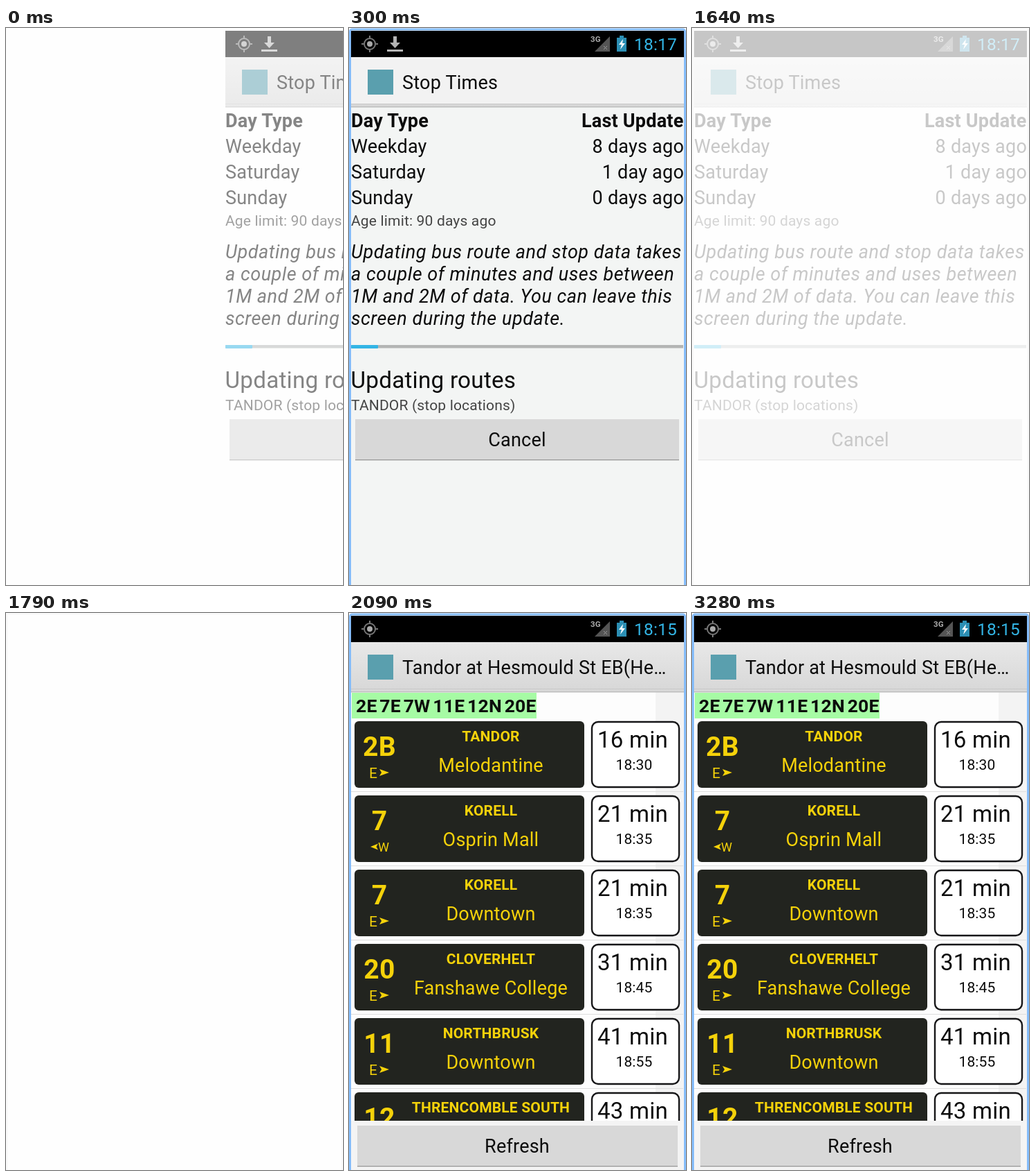
These frames come from a looping animation (487x803 px, 3.7 s). An HTML page:

```html
<!DOCTYPE html>
<html lang="en">
<head>
<meta charset="utf-8">
<title>Stop Times</title>
<style>
  html, body { margin: 0; width: 100%; height: 100%; overflow: hidden; background: #fefefe; }
  svg { display: block; width: 487px; height: 803px; font-family: Roboto, "Noto Sans", sans-serif; }
  text { letter-spacing: .008em; }
  .b { font-weight: 700; }
  .i { font-style: italic; letter-spacing: .0195em; }
</style>
</head>
<body>
<svg id="stage" viewBox="0 0 487 803" xmlns="http://www.w3.org/2000/svg"></svg>
<script>
const LOOP = 3700;
const INK = '#0c0c0c', GREY = '#444', BLUE = '#33b5e5', GOLD = '#f5d20a', CARD = '#22241f';

const rect = (x, y, w, h, fill, more = '') =>
  `<rect x="${x}" y="${y}" width="${w}" height="${h}" fill="${fill}" ${more}/>`;
const path = (d, fill, more = '') => `<path d="${d}" fill="${fill}" ${more}/>`;
const text = (s, x, y, size, { fill = INK, at = 'start', cls = '', more = '' } = {}) =>
  `<text x="${x}" y="${y}" font-size="${size}" fill="${fill}" text-anchor="${at}" class="${cls}" ${more}>${s}</text>`;

const mid = { at: 'middle' };

function statusBar(clock, loading) {
  const gps = `<g fill="none" stroke="#777" stroke-width="2">
    <circle cx="30" cy="23" r="8"/>
    <path d="M30 11v4M30 31v4M18 23h4M38 23h4"/>
    <circle cx="30" cy="23" r="4" fill="#aaa" stroke="none"/></g>`;
  const load = path('M64 12h5v9h5l-7.5 8l-7.5-8h5zM55 31h23v3h-23z', '#b4b4b4');
  return rect(3, 4, 481, 38, '#000') + gps + (loading ? load : '') +
    text('3G', 349, 20, 11.5, { fill: '#aaa', cls: 'b' }) +
    path('M377 12v22h-22z', '#555') +
    path('M368 26l5 5m0-5l-5 5', 'none', 'stroke="#999"') +
    path('M391 11h6v3h4v20h-14v-20h4z', '#2c8fb4') +
    path('M396 16l-6 8h4l-2 7l7-9h-4z', '#fff') +
    text(clock, 474, 32, 24.5, { fill: BLUE, at: 'end' });
}

function header(title) {
  return rect(3, 42, 481, 72, 'url(#bar)') + '<g class="pale">' + rect(3, 42, 481, 68, '#f2f2f2') + '</g>' +
    rect(3, 109, 481, 1, '#c9c9c9') + rect(3, 113, 481, 1.5, '#bdbdbd') +
    rect(27, 60, 37, 36, '#5a9fae') +
    text(title, 77, 88, 27);
}

function button(label, x, y, w) {
  return rect(x, y, w, 59, '#d8d8d8') + rect(x, y + 58, w, 1.3, '#979797') +
    text(label, 243, y + 38.5, 27, mid);
}

function updateScreen() {
  const ages = [['Weekday', '8 days ago'], ['Saturday', '1 day ago'], ['Sunday', '0 days ago']];
  const note = ['Updating bus route and stop data takes', 'a couple of minutes and uses between',
    '1M and 2M of data. You can leave this', 'screen during the update.'];
  return rect(3, 4, 481, 799, '#fefefe') +
    '<g class="pale">' + rect(3, 4, 481, 799, '#f3f5f4') + '</g>' +
    statusBar('18:17', true) + header('Stop Times') +
    text('Day Type', 3, 143, 27, { cls: 'b' }) +
    text('Last Update', 483.5, 143, 27, { cls: 'b', at: 'end' }) +
    ages.map(([day, age], i) => text(day, 3, 180 + 37 * i, 27) +
      text(age, 484, 180 + 37 * i, 27, { at: 'end' })).join('') +
    text('Age limit: 90 days ago', 3, 285, 21, { fill: GREY }) +
    note.map((s, i) => text(s, 3, 332 + 32 * i, 27, { cls: 'i' })).join('') +
    rect(3, 457, 480, 4.5, '#b3b5b4') + rect(3, 457, 39, 5, BLUE, 'rx="1"') +
    '<g id="patch">' + rect(83, 496, 198, 63, '#fff') + '</g>' +
    text('Updating routes', 2.5, 518.5, 33.2) +
    text('TANDOR (stop locations)', 3, 551, 21, { fill: GREY }) +
    button('Cancel', 9, 564, 468);
}

function departure([num, dir, route, dest, wait, clock], i) {
  const gold = { fill: GOLD, at: 'middle' };
  const heading = dir === 'E'
    ? text('E', 29, 237.5, 21, { fill: GOLD }) + path('M44 225l14 5l-14 5l3-5z', GOLD)
    : text('W', 42, 236.5, 18, { fill: GOLD }) + path('M42 225.5l-11 4.5l11 4.5l-2.5-4.5z', GOLD);
  return `<g transform="translate(0 ${107 * i})">` +
    rect(3, 257, 480, 1, '#dedede') +
    rect(8, 156, 332, 96, CARD, 'rx="6"') +
    text(num, 44, 206, 39, { ...gold, cls: 'b' }) + heading +
    text(route, 205, 185, 21, { ...gold, cls: 'b' }) +
    text(dest, 205, 229, 27, gold) +
    rect(351, 157, 126, 94, '#fff', 'rx="9" stroke="#161618" stroke-width="2.4"') +
    text(wait + ' min', 410, 194, 33, mid) +
    text(clock, 412, 226, 21, mid) + '</g>';
}

function stopScreen() {
  const rows = [
    ['2B', 'E', 'TANDOR', 'Melodantine', 16, '18:30'],
    ['7', 'W', 'KORELL', 'Osprin Mall', 21, '18:35'],
    ['7', 'E', 'KORELL', 'Downtown', 21, '18:35'],
    ['20', 'E', 'CLOVERHELT', 'Fanshawe College', 31, '18:45'],
    ['11', 'E', 'NORTHBRUSK', 'Downtown', 41, '18:55'],
    ['12', 'E', 'THRENCOMBLE SOUTH', 'Downtown', 43, '18:57']];
  return rect(3, 4, 481, 799, '#fdfdfd') +
    '<g id="strip">' + rect(443, 114, 41, 689, '#f3f3f3') + '</g>' +
    statusBar('18:15', false) + header('Tandor at Hesmould St EB(He…') +
    rect(4, 115, 267, 37, '#a6fba4') +
    text('2E 7E 7W 11E 12N 20E', 10, 143, 26.5, { cls: 'b', more: 'word-spacing="-3"' }) +
    '<g clip-path="url(#list)">' + rows.map(departure).join('') + '</g>' +
    rect(3, 732, 481, 71, '#f4f4f4') + button('Refresh', 12, 739, 463);
}

const stage = document.getElementById('stage');
stage.innerHTML = `<defs>
    <linearGradient id="bar" x2="0" y2="1"><stop stop-color="#e8e8e8"/><stop offset="1" stop-color="#d7d7d7"/></linearGradient>
    <clipPath id="list"><rect x="3" y="114" width="480" height="618"/></clipPath>
    <clipPath id="screen"><rect x="3" y="4" width="481" height="799"/></clipPath>
  </defs>
  <g id="edge"><rect x="1.5" y="1.5" width="484" height="820" rx="2" fill="none" stroke="#fafafa" stroke-width="3"/></g>
  <g id="update"><g clip-path="url(#screen)">${updateScreen()}</g></g>
  <g id="stop"><g clip-path="url(#screen)">${stopScreen()}</g></g>
  <g id="frame"><rect x="1.5" y="2" width="484" height="820" rx="3" fill="none" stroke="#84bcfa" stroke-width="3"/></g>
  <g id="pointer">${path('M1 1v14l3.5-3l2.5 5l2.5-1l-2.5-5h5z', '#111', 'stroke="#fff"')}</g>`;

// Each step: [start ms, opacity, x, y], held until the next one.
function hold(el, steps) {
  const frames = steps.map(([ms, opacity, x = 0, y = 0]) => ({
    offset: ms / LOOP, opacity, transform: `translate(${x}px, ${y}px)`, easing: 'steps(1, end)'
  }));
  frames.push({ ...frames[frames.length - 1], offset: 1 });
  el.animate(frames, { duration: LOOP, iterations: Infinity });
}

const tracks = {
  '#update': [[0, .5, 314], [150, .97, 1], [300, 1], [1640, .22], [1790, 0]],
  '#stop': [[0, 0], [1940, .94, -40], [2090, 1]],
  '#frame': [[0, 0], [300, 1], [1640, 0], [2090, 1]],
  '#edge': [[0, 0], [1640, 1], [2090, 0]],
  '#update .pale': [[0, 0], [300, 1], [1640, 0]],
  '#stop .pale': [[0, 0]],
  '#patch': [[0, 0], [1050, 1], [1640, 0]],
  '#strip': [[0, 0], [2090, 1]],
  '#pointer': [[0, 0], [750, 1, 265, 541], [1050, 1, 84, 496], [1190, 0],
    [2690, 1, 364, 608], [2830, 0], [3130, 1, 480, 794], [3280, 0]]
};
for (const [sel, steps] of Object.entries(tracks))
  for (const el of stage.querySelectorAll(sel)) hold(el, steps);
</script>
</body>
</html>
```
